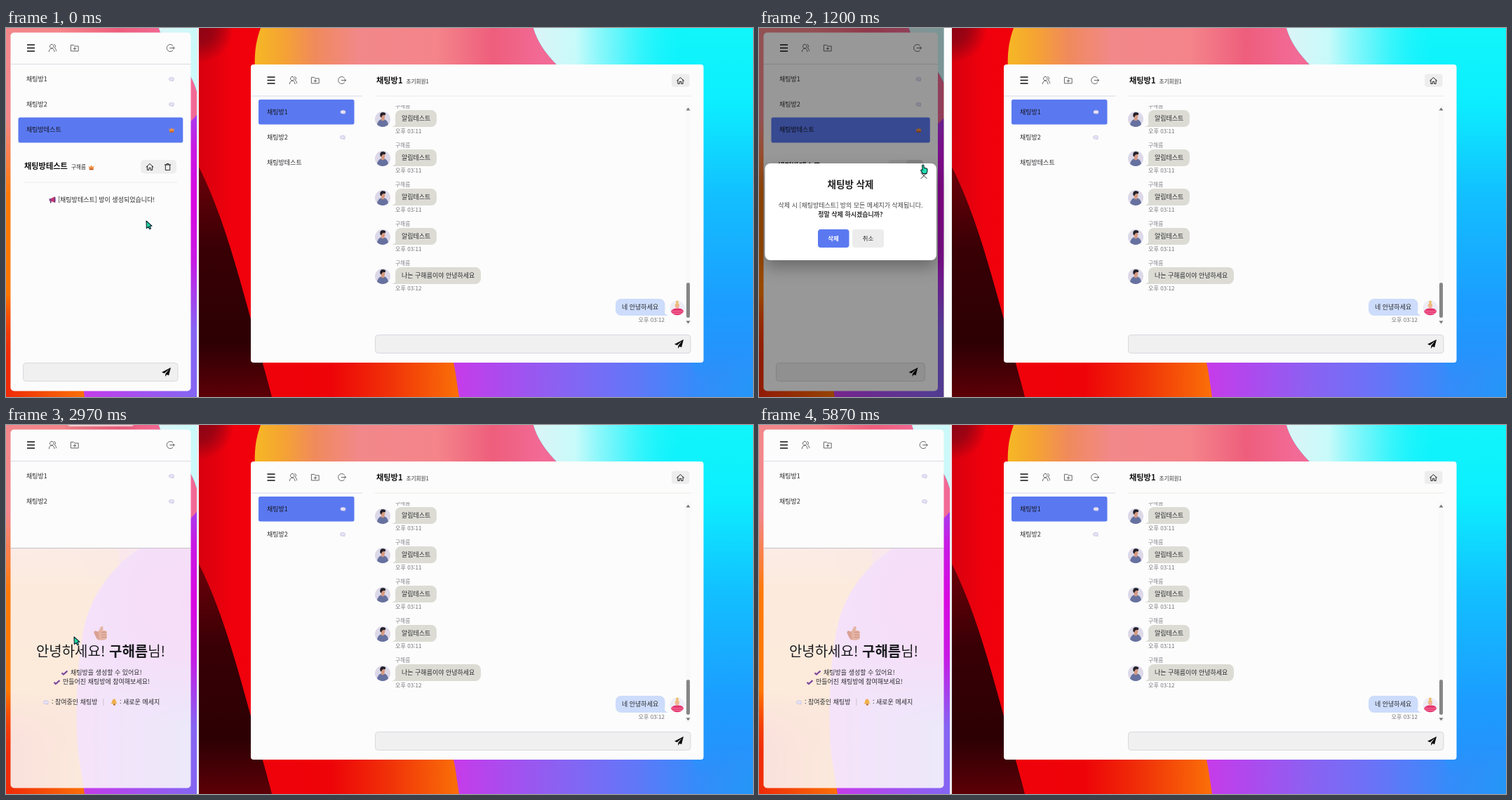
These frames come from a looping animation (1065x526 px, 5900 ms). An HTML page:

```html
<!DOCTYPE html>
<html lang="ko">
<head>
<meta charset="utf-8">
<title>Chat room deletion</title>
<style>
html, body { margin: 0; width: 100%; height: 100%; overflow: hidden; background: #fff; }
svg { display: block; }
text { font-family: 'Noto Sans CJK KR', 'Noto Sans CJK', 'Noto Sans', sans-serif; white-space: pre; }
.line { fill: none; stroke: #555; stroke-width: .9; stroke-linecap: round; stroke-linejoin: round; }
.dark { stroke: #111; }
#toast, #tick { transform-box: fill-box; transform-origin: center; }
</style>
</head>
<body>
<svg id="stage" width="1065" height="526" viewBox="0 0 1065 526"></svg>
<script>
const LOOP = 5900;
const USER = '구해름', MEMBER = '초기회원1';
const PAPER = '#fcfcfc', BLUE = '#5a79f1';

// Drawing helpers
const text = (x, cy, size, str, o = {}) =>
  `<text x="${x}" y="${cy + size * .37}" font-size="${size}" font-weight="${o.w || 400}" ` +
  `fill="${o.c || '#2c2c30'}" text-anchor="${o.a || 'start'}">${str}</text>`;
const box = (x, y, x2, y2, fill, r = 0, more = '') =>
  `<rect x="${x}" y="${y}" width="${x2 - x}" height="${y2 - y}" rx="${r}" fill="${fill}" ${more}/>`;
const rule = (x, x2, y, c) => box(x, y, x2, y + 1, c);
const at = (x, y, body, id = '') => `<g ${id && `id="${id}"`} transform="translate(${x} ${y})">${body}</g>`;
const line = (d, cls = '') => `<path class="line ${cls}" d="${d}"/>`;
const fill = (d, c, more = '') => `<path d="${d}" fill="${c}" ${more}/>`;
const oval = (x, y, rx, ry, c, more = '') =>
  `<ellipse cx="${x}" cy="${y}" rx="${rx}" ry="${ry}" fill="${c}" ${more}/>`;
const grad = (id, dir, stops) =>
  `<linearGradient id="${id}" gradientUnits="userSpaceOnUse" x1="0" y1="0" x2="${dir === 'h' ? 790 : 0}" y2="${dir === 'h' ? 0 : 526}">` +
  stops.map(([o, c, a = 1]) => `<stop offset="${o}" stop-color="${c}" stop-opacity="${a}"/>`).join('') +
  '</linearGradient>';
const glow = (id, x, y, r, c) =>
  `<radialGradient id="${id}" gradientUnits="userSpaceOnUse" cx="${x}" cy="${y}" r="${r}">` +
  `<stop offset="0" stop-color="${c}"/><stop offset=".45" stop-color="${c}" stop-opacity=".8"/>` +
  `<stop offset="1" stop-color="${c}" stop-opacity="0"/></radialGradient>`;

// Icons, centred on 0,0
const icon = {
  menu: `<path d="M-5.5 -4.5H5.5M-5.5 0H5.5M-5.5 4.5H5.5" stroke="#111" stroke-width="1.3"/>`,
  people: line('M-1.2 -5.2a2.8 2.8 0 1 1 -.1 0M-5.2 5.2C-4.8 -1 2.2 -1 2.6 5.2M2.2 -5a2.5 2.5 0 0 1 .4 4.7C4.2 .6 5 2.4 5.2 4.2'),
  folder: line('M-5.2 -4.2H-1.5L0 -2.6H5.2V4.4H-5.2ZM0 -1V2.8M-1.9 .9H1.9'),
  exit: line('M3.2 -3.8A5.1 5.1 0 1 0 3.2 3.8M-.8 0H5.6M3.6 -2L5.6 0L3.6 2'),
  home: line('M-5 .2L0 -4.5L5 .2M-3.6 -1V4.5H-1.2V1.4H1.2V4.5H3.6V-1', 'dark'),
  trash: line('M-4.2 -3H4.2M-1.5 -3V-4.5H1.5V-3M-3.2 -3V4.6H3.2V-3', 'dark'),
  plane: fill('M6.5 -6.5L-6.5 .3L-2.8 1.8L4 -4L-1.2 2.5L-1.4 6.5L.8 3.6L3.6 4.8Z', '#0c0c0c'),
  bubble: oval(0, -.2, 3.7, 2.5, '#e6e2f4', 'stroke="#bdb8dc" stroke-width=".6"') + fill('M1 2L2.8 3.4L2.6 1.6Z', '#bdb8dc'),
  crown: fill('M-3.8 -2.2L-1.8 -.8L0 -3.6L1.8 -1L3.9 -2.4L3 3.2H-2.6Z', '#ef9247') + fill('M-2.6 1.6H3V3.2H-2.6Z', '#b9552c'),
  horn: fill('M-4.5 -1.5L-1 -2.2V2L-4.2 1.8Z', '#8a3f8c') + fill('M-1 -2.4L3.4 -4.4V4L-1 2Z', '#c9376d') +
    fill('M-3 1.8H-1.4V4.4H-3Z', '#5b2d66') + oval(3.6, -.2, 1, 4.2, '#6f3a86'),
  check: `<path d="M-4 .4L-1.6 2.6L4 -2.4" fill="none" stroke="#7e4a9c" stroke-width="2.2"/>`,
  bell: fill('M-4.4 2.6C-2.6 1 -3 -4.4 .2 -4.4C3.2 -4.4 2.6 1 4.4 2.6Z', '#f0b04a') + oval(.4, 3.5, 1.5, 1.2, '#b46a2a'),
  hand: fill('M-9 -3C-6 -5 -5 -1 -3 -3L0 -9C2 -11 4 -10 3.6 -7L3 -4H7C9 -3 9 -1 8.6 1L9 6C8 10 3 10 -2 9.6C-6 9 -7 4 -9.4 -.4Z', '#e5b3a4') +
    `<path d="M1 -1.6H8M1 2H8.4M1 5.6H8" stroke="#c58d80" stroke-width=".9" fill="none"/>` +
    fill('M-9 -3C-6 -5 -5 -1 -3 -3C-3 2 -3 6 -2 9.6C-6 9 -7 4 -9.4 -.4Z', '#d9a294'),
  arrow: fill('M0 0L.4 10.6L2.9 8.3L4.8 11.8L6.6 10.8L4.8 7.5L8 7.1Z', '#20d9a0', 'stroke="#123" stroke-width="1.1" stroke-linejoin="round"'),
  finger: fill('M-1.3 1C-1 -.3 .8 -.3 1 1L1.3 4.4L5 5.2C6.3 5.6 6.2 7 6 8.6L5 12.6H-.4L-3.2 8.4C-3.4 7 -2 6.6 -.9 7.6Z', '#1fe0b4', 'stroke="#122" stroke-width="1.1" stroke-linejoin="round"'),
  beam: `<path d="M-3.6 -5H3.6M0 -5V5M-3.6 5H3.6" stroke="#222" stroke-width="1.7" fill="none"/>`
};
const put = (x, y, name) => at(x, y, icon[name]);

const wall = `<defs>` +
  grad('base', 'h', [[0, '#d8000e'], [.06, '#f0000c'], [.24, '#ee0408'], [.34, '#f03008'], [.47, '#fa7008']]) +
  grad('maroon', 'v', [[.38, '#6c0008'], [.6, '#380005'], [.85, '#2c0004'], [1, '#5c0006']]) +
  grad('salmon', 'h', [[.1, '#f6b824'], [.15, '#f5a432'], [.21, '#f08a5c'], [.29, '#f2888a'], [.43, '#f4848a'], [.53, '#ee5e7c'], [.62, '#f26a96']]) +
  grad('amber', 'v', [[.24, '#ff7a10', 0], [.45, '#ff7a08'], [.72, '#ff7800'], [.9, '#f83808', 0]]) +
  grad('violet', 'h', [[.46, '#c73be9'], [.53, '#b048ee'], [.65, '#8a62f2'], [.78, '#6476f8'], [.9, '#348cfa'], [1, '#2496f8']]) +
  grad('cyan', 'v', [[0, '#10f6fa'], [.2, '#0ceeff'], [.45, '#12c0ff'], [.75, '#1c9cff'], [.88, '#2494fc'], [.96, '#2c90fa', 0]]) +
  grad('mist', 'h', [[.6, '#dcf4f6'], [.68, '#c8fafa'], [.76, '#80f6fb', .7], [.87, '#20f4fb', 0]]) +
  glow('magenta', 525, 250, 180, '#d808e0') + glow('corner', 0, 0, 50, '#8c0414') +
  `<g id="wall">` + box(0, 0, 790, 526, 'url(#base)') + box(0, 0, 60, 60, 'url(#corner)') +
  fill('M0 198C32 262 52 335 74 415C84 455 95 490 104 526H0Z', 'url(#maroon)') +
  fill('M88 0C80 22 79 40 80 60C95 200 180 270 250 290H600V0Z', 'url(#salmon)') +
  box(200, 120, 420, 476, 'url(#amber)') +
  fill('M371 526C367 500 366 490 363 477C356 420 360 340 370 290C382 230 430 180 480 160C510 146 530 130 540 110H790V526Z', 'url(#violet)') +
  fill('M371 477H363C356 420 360 340 370 290C382 230 430 180 480 160C510 146 530 130 540 110H718V477Z', 'url(#magenta)') +
  ['cyan', 'mist'].map((g, i) =>
    fill(`M477 0C484 24 499 41 512 54C522 66 529 80 533 98C570 190 650 300 718 ${i ? 300 : 526}H790V0Z`, `url(#${g})`)).join('') +
  `</g><filter id="soft" x="-40%" y="-60%" width="180%" height="250%"><feDropShadow dx="0" dy="3" stdDeviation="4" flood-opacity=".13"/></filter>` +
  `<filter id="deep" x="-30%" y="-30%" width="160%" height="190%"><feDropShadow dx="0" dy="10" stdDeviation="11" flood-opacity=".3"/></filter></defs>`;
const view = (x, w, shift) =>
  `<svg x="${x}" y="0" width="${w}" height="526"><use href="#wall" x="${shift}"/></svg>`;

const field = (x, x2, y) =>
  box(x + .5, y + .5, x2 - .5, y + 26.5, '#f0f0f0', 4, 'stroke="#d9d9e0"') + put(x2 - 17, y + 13.5, 'plane');
const title = (x, y, room, who) =>
  text(x, y, 11.2, room, { w: 700, c: '#111' });

// Left window; d is how far the page narrows
function leftPage(d, room) {
  const R = 263.5 - d, mid = 135 - d / 2;
  let s = view(0, 272 - d, -259 - d / 2);
  if (room) s += box(6.5, 6.5, R, 517.5, PAPER, 5);
  else s += fill(`M6.5 176V11.5a5 5 0 0 1 5 -5H${R - 5}a5 5 0 0 1 5 5V176Z`, PAPER) +
    fill(`M6.5 176H${R}V512.5a5 5 0 0 1 -5 5H11.5a5 5 0 0 1 -5 -5Z`, PAPER, 'fill-opacity=".87"') +
    rule(6.5, R, 175, '#c4c0c4');
  s += rule(6.5, R, 51, '#dadae6') + put(35.5, 28.5, 'menu') + put(66.5, 28.5, 'people') +
    put(98, 28.5, 'folder') + put(234.5 - d, 28.5, 'exit');
  ['채팅방1', '채팅방2'].forEach((n, i) => {
    s += text(29, 73 + 36 * i, 9, n) + put(236 - d, 73 + 36 * i, 'bubble');
  });
  if (room) {
    s += box(17.5, 127.5, 252.3 - d, 163.5, BLUE, 2.5) + text(29, 145, 9, '채팅방테스트', { c: '#15151c' }) +
      put(236 - d, 145.5, 'crown') + title(26, 197, '채팅방테스트') +
      text(93, 198.5, 7.6, USER, { w: 500 }) + put(121.5, 199, 'crown') +
      box(192 - d, 188, 243 - d, 207.5, '#eeeeee', 5) +
      `<g class="hover">${box(218 - d, 188, 243 - d, 207.5, '#dadada', 5)}</g>` +
      put(205 - d, 198, 'home') + put(230.5 - d, 198, 'trash') +
      rule(26, 244 - d, 219.5, '#e9e9f2') + put(66 - d / 2, 245, 'horn') +
      text(74 - d / 2, 244.5, 9, '[채팅방테스트] 방이 생성되었습니다!') + field(24, 245.5 - d, 477);
  } else {
    s += put(135, 297, 'hand') +
      text(mid, 323, 20, `안녕하세요! <tspan font-weight="700">${USER}</tspan>님!`, { w: 300, a: 'middle', c: '#1c1c20' }) +
      put(83.5, 353, 'check') + text(92, 352.5, 9, '채팅방을 생성할 수 있어요!') +
      put(72.5, 366.5, 'check') + text(81, 366, 9, '만들어진 채팅방에 참여해보세요!') +
      put(57, 395.5, 'bubble') + text(65, 395, 9, ': 참여중인 채팅방') + box(138.5, 390, 139.3, 400, '#c4bcc4') +
      put(154, 395, 'bell') + text(162, 395, 9, ': 새로운 메세지');
  }
  return s;
}

const man = oval(0, 0, 11, 11, '#dcd8e8') + fill('M-8 7.5C-6 1 -3 0 0 0C4 0 7 2 8 7.5C4 12 -4 12 -8 7.5Z', '#66719f') +
  fill('M-2 -3H2.4V1.5C1 2.6 -1 2.6 -2 1.5Z', '#d69a82') + oval(.3, -4, 3, 3.6, '#d69a82') +
  fill('M-3.4 -3.4C-4.8 -9 -1 -10.4 2 -9.4C5 -9 4.4 -5.6 3.2 -5.8C1 -6.4 -1 -6 -1.8 -2.6Z', '#23202a');
const woman = oval(0, 0, 10.5, 10.5, '#eeecf6') + fill('M-9 5C-7 1 -3 .4 0 .4C4 .4 8 1 9 5C6 12 -6 12 -9 5Z', '#e5336e') +
  `<path d="M-8 4.8H8M-7 7.6H7" stroke="#f78bab" stroke-width=".9"/>` + oval(0, -3, 2.8, 4, '#f0b29a') +
  fill('M-3.4 -2C-4 -8 3.6 -8 3.2 -2C2 -5 -1 -6 -3.4 -2Z', '#eec06a') + oval(0, -8.6, 2, 2, '#eec06a');

function message(y, str, right, time) {
  const name = { c: '#85858c' }, stamp = { c: '#74747a' };
  return text(555, y - 17.5, 7.7, USER, name) + at(537, y + 1, man) +
    fill(`M556 ${y + 3}C556 ${y + 9} 554 ${y + 11} 550 ${y + 12}H566Z`, '#dcdcd5') +
    box(555, y - 12, right, y + 12, '#dcdcd5', 8) + text(564, y, 9, str) +
    text(555, y + 18.3, 8.1, time, stamp);
}

const rightPage = view(275, 790, 0) + box(349, 52, 994.5, 477, PAPER, 4) +
  rule(349, 508, 96.5, '#dadcec') + rule(526, 977, 96.5, '#ecece2') +
  put(378, 74.5, 'menu') + put(409.5, 74.5, 'people') + put(441, 74.5, 'folder') + put(479, 74.5, 'exit') +
  box(360, 102, 496.5, 137.5, BLUE, 2.5) + text(372, 120, 9, '채팅방1', { c: '#15151c' }) + put(480.5, 120, 'bubble') +
  text(372, 156, 9, '채팅방2') + put(480, 156, 'bubble') +
  `<g id="room3">${text(372, 191.5, 9, '채팅방테스트')}</g>` +
  title(528, 74.5, '채팅방1') + text(570.5, 75.8, 7.65, MEMBER, { w: 500 }) +
  box(949, 65.5, 974.5, 84, '#ededed', 4) + put(961.5, 75, 'home') +
  `<svg x="0" y="110" width="1065" height="316" viewBox="0 110 1065 316">` +
  [0, 1, 2, 3].map(i => message(129 + 56 * i, '알림테스트', 614, '오후 03:11')).join('') +
  message(353, `나는 ${USER}이야 안녕하세요`, 677, '오후 03:12') +
  fill('M938 401C938 407 941 409 944.500 410H930Z', '#cddcfb') + box(869, 386, 939.5, 410, '#cddcfb', 8) +
  text(878, 398, 9, '네 안녕하세요') + at(957, 399, woman) +
  text(939, 416, 8.1, '오후 03:12', { a: 'end', c: '#74747a' }) + `</svg>` +
  box(968.5, 110, 976, 425, '#f9f9f9') + box(970, 363, 975, 413, '#868686', 2.5) +
  fill('M969.500 117.500L972.500 113.500L975.500 117.500ZM969.500 417.500L972.500 421.500L975.500 417.500Z', '#777') +
  field(526, 976.5, 437);

const modal = `<g filter="url(#deep)">${box(8.5, 193, 253, 331, '#fff', 8)}</g>` +
  line('M231 206.500L239 214.500M239 206.500L231 214.500', 'dark') +
  text(130.5, 223, 13.5, '채팅방 삭제', { w: 700, a: 'middle', c: '#222' }) +
  text(130.5, 252.5, 9, '삭제 시 [채팅방테스트] 방의 모든 메세지가 삭제됩니다.', { a: 'middle', c: '#444' }) +
  text(130.5, 266, 9, '정말 삭제 하시겠습니까?', { w: 700, a: 'middle', c: '#333' }) +
  box(84, 287, 128.5, 313, BLUE, 4) + `<g id="press">${box(84, 287, 128.5, 313, '#4f6cda', 4)}</g>` +
  text(106, 299.5, 8.4, '삭제', { w: 700, a: 'middle', c: '#fff' }) +
  box(133, 287, 178, 313, '#ececec', 4) + text(155.5, 299.5, 8.4, '취소', { w: 500, a: 'middle' });

const toast = `<g filter="url(#soft)">${box(75, 6, 195, 31, '#fff', 5)}</g>` +
  `<g id="tick">${oval(85.5, 18.5, 5.7, 5.7, '#61d345')}<path d="M83 18.600L85 20.600L88.300 16.600" fill="none" stroke="#fff" stroke-width="1.3"/></g>` +
  text(97, 18.5, 9, '삭제가 완료되었습니다!', { c: '#363636' });

document.getElementById('stage').innerHTML = wall + rightPage +
  `<g id="wide">${leftPage(0, true)}</g><g id="narrow">${leftPage(8.5, true)}</g><g id="done">${leftPage(0, false)}</g>` +
  box(272, 0, 275, 526, '#ececf0') + `<g id="gutter">${box(263.5, 0, 274.5, 526, '#fdfdfd')}</g>` +
  `<g id="shade">${box(0, 0, 263.5, 526, '#000')}</g><g id="modal">${modal}</g><g id="toast">${toast}</g>` +
  `<g id="cursor"><g id="arrow">${icon.arrow}</g><g id="finger">${icon.finger}</g><g id="beam">${icon.beam}</g></g>`;

// Each row: time in ms, properties, easing to the next row
function run(sel, rows) {
  const keys = rows.map(([ms, props, easing = 'linear']) => ({ offset: ms / LOOP, easing, ...props }));
  const full = [...keys, { ...keys[keys.length - 1], offset: 1 }];
  document.querySelectorAll(sel).forEach(el => el.animate(full, { duration: LOOP, iterations: Infinity }));
}
const show = (sel, ...spans) => {
  const rows = [[0, { opacity: 0 }, 'step-end']];
  spans.forEach(([a, b]) => {
    if (a === 0) rows.length = 0;
    rows.push([a, { opacity: 1 }, 'step-end']);
    if (b < LOOP) rows.push([b, { opacity: 0 }, 'step-end']);
  });
  run(sel, rows);
};

const OPEN = 960, CLOSE = 2690, DONE = 2900, TOAST = 2920, LEAVE = 4920;
show('#wide', [0, OPEN]);
show('#narrow', [OPEN, DONE]);
show('#gutter', [OPEN, DONE]);
show('#done', [DONE, LOOP]);
show('#room3', [0, DONE]);
show('.hover', [700, 1290]);
show('#press', [1690, DONE]);
show('#arrow', [0, 620], [1290, 1660], [2800, 3420], [4080, LOOP]);
show('#finger', [620, 1290], [1660, 2800]);
show('#beam', [3420, 4080]);

const fade = top => [[0, { opacity: 0 }], [OPEN, { opacity: 0 }], [OPEN + 220, { opacity: top }],
  [CLOSE, { opacity: top }], [CLOSE + 200, { opacity: 0 }]];
run('#shade', fade(.4));
run('#modal', fade(1));

const away = (dy, opacity) => ({ transform: `translateY(${dy}px) scale(.6)`, opacity });
const home = { transform: 'translateY(0px) scale(1)', opacity: 1 };
run('#toast', [[0, away(-50, 0), 'step-end'], [TOAST, away(-50, .5), 'cubic-bezier(.21,1.02,.73,1)'],
  [TOAST + 350, home], [LEAVE, home, 'cubic-bezier(.06,.71,.55,1)'], [LEAVE + 400, away(-37.5, 0)]]);
run('#tick', [[0, { transform: 'scale(0) rotate(45deg)' }], [TOAST + 100, { transform: 'scale(0) rotate(45deg)' }, 'cubic-bezier(.175,.885,.32,1.275)'],
  [TOAST + 400, { transform: 'scale(1) rotate(0deg)' }]]);

const spot = (x, y) => ({ transform: `translate(${x}px,${y}px)` });
run('#cursor', [[0, spot(200, 275), 'ease-in-out'], [700, spot(234, 195)], [1200, spot(234, 195), 'ease-in-out'],
  [1800, spot(94, 306)], [2600, spot(94, 306), 'ease-in-out'], [2900, spot(97, 302)], [3150, spot(97, 302), 'ease-in-out'],
  [3600, spot(131, 293.5)], [4000, spot(131, 293.5), 'ease-in'], [4700, spot(150, 540)]]);
</script>
</body>
</html>
```
